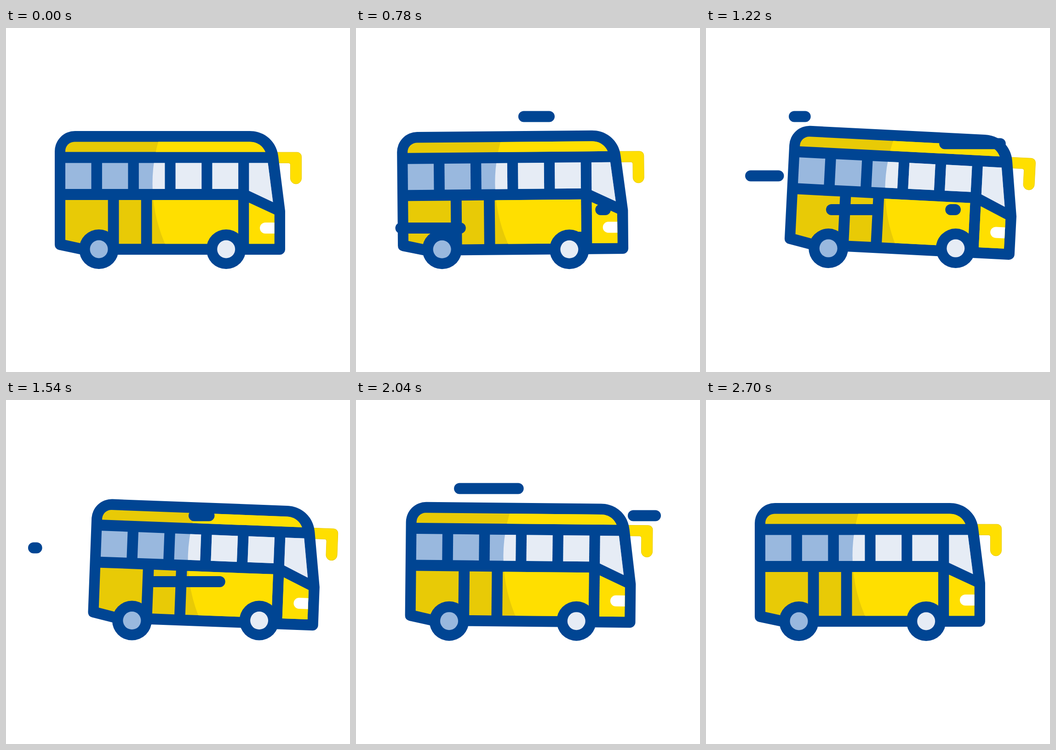
An HTML page for the animation above (2800 ms loop, 748 by 748 pixels).

```html
<!DOCTYPE html>
<html lang="en">
<head>
<meta charset="utf-8">
<title>Bus</title>
<style>
  html, body { margin: 0; width: 100%; height: 100%; overflow: hidden; background: #fff; }
  svg { display: block; width: 100%; height: 100%; }
  .blue { fill: #004593; }
  .streak { stroke: #004593; stroke-width: 24; stroke-linecap: round; }
  .shade .paint { fill: #e8ca06; }
  .shade .glass { fill: #99b8de; }
  .light .paint { fill: #ffdf00; }
  .light .glass { fill: #e6ecf5; }
</style>
</head>
<body>
<svg viewBox="0 0 748 748">
  <defs>
    <clipPath id="lit"><circle cx="648.5" cy="338" r="330"/></clipPath>
  </defs>
  <g id="body">
    <path fill="#ffdf00" stroke="#e8ca06" stroke-width="1"
      d="M580 270.2H633a9.5 9.5 0 0 1 9.5 9.5V327a12 12 0 0 1-24 0V298q0-4.5-4.5-4.5H580Z"/>
    <path class="blue" d="M106 268a44 44 0 0 1 44-44H530C562 224 588 246 592 279L607 398V481a12 12 0 0 1-12 12H165L115 482.5Q106 480 106 471Z"/>
    <g class="shade" id="shade"></g>
    <g clip-path="url(#lit)"><g class="light" id="light"></g></g>
    <path fill="#fff" d="M583.5 423H564a12 12 0 0 0 0 24H583.5Z"/>
  </g>
  <g id="wheels">
    <circle class="blue" cx="202" cy="481" r="43"/>
    <circle fill="#99b8de" cx="202" cy="481" r="19.5"/>
    <circle class="blue" cx="478.7" cy="481" r="43"/>
    <circle fill="#e6ecf5" cx="478.7" cy="481" r="19.5"/>
  </g>
  <g id="streaks"></g>
</svg>
<script>
const LOOP = 2800, STEP = 20;
const RUN = 500, LAG = 200; // travel time of a streak's head, delay of its tail
const el = id => document.getElementById(id);

let panels = `
  <path class="glass" d="M528.5 293.5H569.5L580.5 378.5L528.5 354Z"/>
  <path class="paint" d="M129 269.5V267.5a20 20 0 0 1 20-20H530C546 247.5 558 256 564 269.5Z"/>
  <path class="paint" d="M129 374H221.7V470H171L129 460.8Z"/>
  <path class="paint" d="M245.5 374H293.8V469.3H245.5Z"/>
  <path class="paint" d="M317.5 374H505V469.3H317.5Z"/>
  <path class="paint" d="M528.5 380L583.5 405.5V469.3H528.5Z"/>`;
for (let i = 0; i < 5; i++) {
  panels += `<rect class="glass" x="${129 + i * 79.9}" y="293.5" width="56.5" height="56.5"/>`;
}
el('shade').innerHTML = panels;
el('light').innerHTML = panels;

// Turning points of the bus: [time, value]
const shift = [[220, 0], [605, -28], [1400, 78], [2340, -24], [2700, 0]];
const tilt = [[200, 0], [500, -2.05], [1260, 2.93], [2000, 0.53], [2460, 2.1], [2700, 0]];

const streaks = [];
function addStreak(y, from, to, start) {
  const line = document.createElementNS('http://www.w3.org/2000/svg', 'line');
  line.setAttribute('class', 'streak');
  line.setAttribute('y1', y);
  line.setAttribute('y2', y);
  el('streaks').append(line);
  streaks.push({ line, from, to, start });
}
addStreak(455, 599, 484, 200);
addStreak(435, 295, 64, 400);
addStreak(321.5, 170, 60, 915);
for (const pass of [0, 1]) {
  addStreak(192.5, 420, 192, 620 + pass * 1040);
  addStreak(395, 542, 273, 723 + pass * 440);
  addStreak(251.5, 651, 409, 955 + pass * 942);
}

function ease(s) {
  s = Math.min(1, Math.max(0, s));
  return s * s * (3 - 2 * s);
}

const mix = (a, b, s) => a + (b - a) * ease(s);

function track(keys, t) {
  let i = 0;
  while (i < keys.length - 2 && t > keys[i + 1][0]) i++;
  const [t0, a] = keys[i], [t1, b] = keys[i + 1];
  return mix(a, b, (t - t0) / (t1 - t0));
}

function draw(t) {
  const dx = track(shift, t), angle = track(tilt, t), dy = -0.65 * angle;
  el('body').setAttribute('transform', `translate(${dx} ${dy}) rotate(${angle} 340.5 481)`);
  el('wheels').setAttribute('transform', `translate(${dx} ${dy})`);
  for (const { line, from, to, start } of streaks) {
    const age = t - start;
    const on = age > 0 && age < RUN + LAG;
    line.setAttribute('visibility', on ? 'visible' : 'hidden');
    line.setAttribute('x1', mix(from, to, age / RUN));
    line.setAttribute('x2', mix(from, to, (age - LAG) / RUN));
  }
}

const begin = performance.now();
function tick() {
  const t = (performance.now() - begin) % LOOP;
  draw(Math.floor(t / STEP) * STEP);
  requestAnimationFrame(tick);
}
tick();
</script>
</body>
</html>
```
